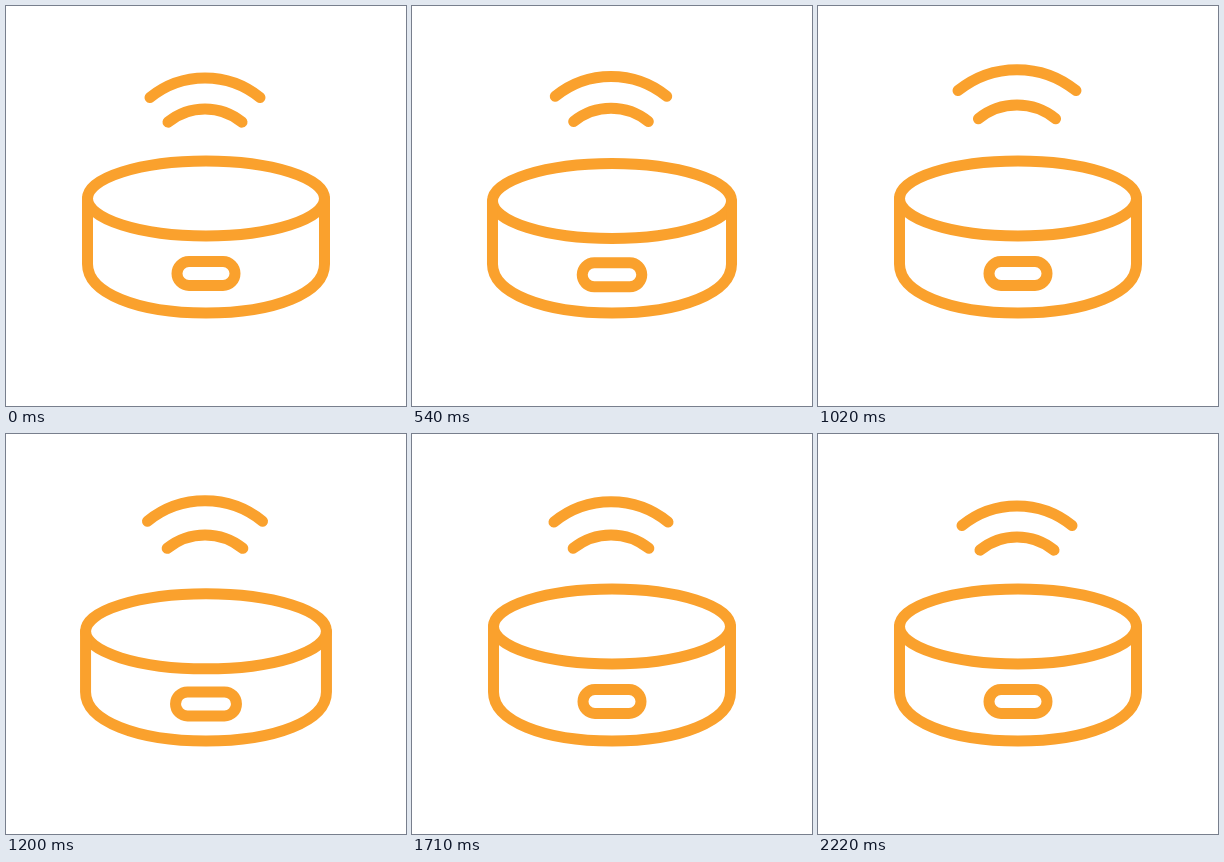
Animation, 400 px wide and 400 px high, one loop 2250 ms. Source, as an HTML page:

```html
<!DOCTYPE html>
<html>
<head>
<meta charset="utf-8">
<style>
  html, body { margin: 0; width: 100%; height: 100%; overflow: hidden; background: #fff; }
  svg { display: block; width: 100vw; height: 100vh; }
</style>
</head>
<body>
<svg viewBox="0 0 400 400" fill="none" stroke="#faa12d" stroke-width="11" stroke-linecap="round">
  <ellipse id="lid" cx="200" ry="37.5"/>
  <path id="shell"/>
  <rect id="button" height="24" rx="12"/>
  <path class="wave"/>
  <path class="wave"/>
  <path class="wave"/>
</svg>
<script>
const LOOP = 2250, FRAME = 30;
const pulses = [{ start: 0, peak: 210 }, { start: 510, peak: 840 }, { start: 1140, peak: 1470 }];

// Crest height and half width, at rest and fully spread; hidden below `from`.
const waves = [
  { y: [72, 6], w: [55, 86.5], fade: 87, from: 0 },
  { y: [103, 77], w: [37, 47.5], fade: 95, from: 0 },
  { y: [123, 119], w: [20.5, 23.5], fade: 87, from: .25 },
];
const paths = document.querySelectorAll('.wave');

const el = id => document.getElementById(id);
const mix = ([a, b], k) => a + (b - a) * k;
const progress = (t, { start, peak }) => Math.max(0, Math.min(1, (t - start) / (peak - start)));

// Eases out to the peak, then falls back exponentially.
function spread(t, fade) {
  return Math.max(...pulses.map(p => t < p.peak
    ? Math.sin(Math.PI / 2 * progress(t, p)) ** 2
    : Math.exp((p.peak - t) / fade)));
}

function drawWave(path, wave, t) {
  const k = spread(t, wave.fade);
  const y = mix(wave.y, k), w = mix(wave.w, k);
  const sag = w * .355, r = (w * w + sag * sag) / (2 * sag);
  path.setAttribute('d', k >= wave.from
    ? `M${199 - w},${y + sag}A${r},${r} 0 0 1 ${199 + w},${y + sag}` : '');
}

function drawBody(squash) {
  const rx = 118.5 + squash * .4, y = 192.5 + squash;
  const left = 200 - rx, right = 200 + rx, half = 29 + squash * .3;
  el('lid').setAttribute('cy', y);
  el('lid').setAttribute('rx', rx);
  el('shell').setAttribute('d',
    `M${left},${y}V258C${left},287 131,307 200,307S${right},287 ${right},258V${y}`);
  el('button').setAttribute('x', 200 - half);
  el('button').setAttribute('width', half * 2);
  el('button').setAttribute('y', 255.5 + squash / 2);
}

function draw(now) {
  const t = Math.floor(now % LOOP / FRAME) * FRAME;
  drawBody(9 * Math.max(...pulses.map(p => Math.sin(Math.PI * progress(t, p)))));
  paths.forEach((path, i) => drawWave(path, waves[i], t));
}

const began = performance.now();
function tick() {
  draw(performance.now() - began);
  requestAnimationFrame(tick);
}
tick();
</script>
</body>
</html>
```
